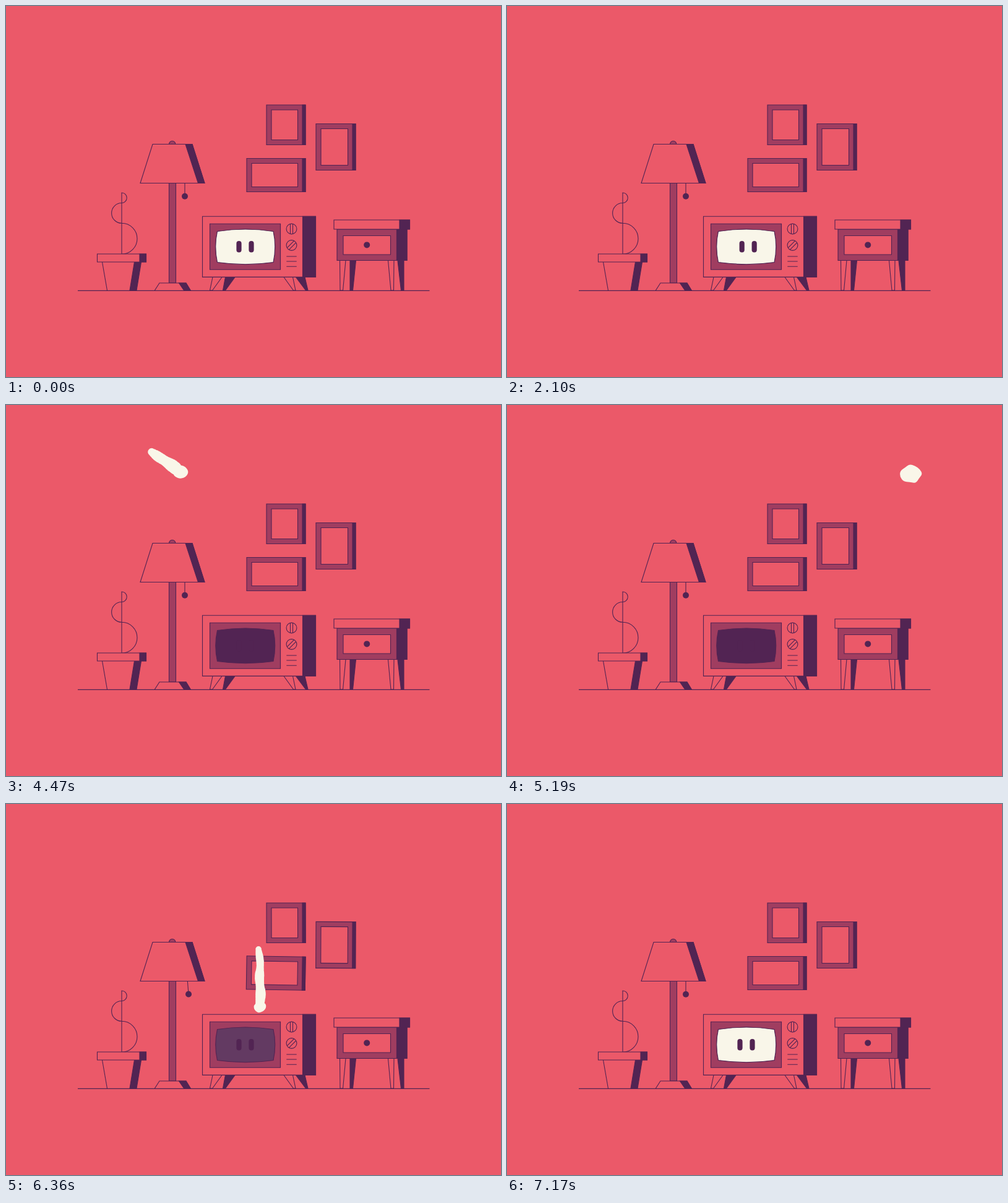
Write an HTML page that moves like this. It is 800 px wide and 600 px high and loops after 7.2 s.

```html
<!DOCTYPE html>
<html lang="en">
<head>
<meta charset="utf-8">
<title>Living room</title>
<style>
  html, body { margin: 0; width: 100%; height: 100%; overflow: hidden; background: #eb5969; }
  svg { display: block; width: 100vw; height: 100vh; stroke: #522453; stroke-width: 1.1; }
  .bg { fill: #eb5969; }
  .mid { fill: #a03d60; }
  .dark { fill: #522453; }
  .cream { fill: #f9f6e9; }
  .line { fill: none; }
  .flat { stroke: none; }
</style>
</head>
<body>
<svg viewBox="0 0 800 600">
  <defs>
    <path id="glass" d="M341.5 364.5Q387 357.5 432 364.5Q437.5 389 432 414.5Q387 421 341.5 414.5Q336 389 341.5 364.5Z"/>
  </defs>
  <path d="M116 460.4H684.5"/>

  <g id="plant">
    <path class="line" d="M187 401V302A8.25 8.25 0 0 1 187 318.5A16.4 16.4 0 0 0 187 351.3A25 25 0 0 1 187 401.3"/>
    <path class="line" d="M155.5 414L163.5 460"/>
    <path class="dark" d="M207.5 414H218.5L211 460H200Z"/>
    <path class="bg" d="M147.5 401H226.5V414H147.5Z"/>
    <path class="dark" d="M216 401H226.5V414H216Z"/>
  </g>

  <g id="lamp">
    <g id="cord">
      <path d="M289 232V308"/>
      <circle class="dark flat" cx="289" cy="307.8" r="5"/>
    </g>
    <path class="mid" d="M263.5 286.5H274.5V448H263.5Z"/>
    <path class="bg" d="M248 448H291L298.5 460.4H240Z"/>
    <path class="dark" d="M279.5 448H291L298.5 460.4H288Z"/>
    <path class="mid" d="M263.5 223.5A5.2 5.2 0 0 1 273.9 223.5Z"/>
    <path class="bg" d="M237 223.5H301L321 286.5H217Z"/>
    <path class="dark" d="M290 223.5H301L321 286.5H310.5Z"/>
  </g>

  <g id="frames"></g>

  <g id="table">
    <path class="line" d="M539.5 411.5L540 460H544.5L549 411.5M617.5 411.5L622 460H626.5L627 411.5"/>
    <path class="dark" d="M556 411.5H565.5L560.5 460H556ZM633 411.5H643V460H638.5Z"/>
    <path class="mid" d="M535 361H648V411.5H535Z"/>
    <path class="dark" d="M631.5 361H648V411.5H631.5Z"/>
    <path class="bg" d="M545 371.5H621.5V402H545Z"/>
    <circle class="dark flat" cx="583.2" cy="386.4" r="5"/>
    <path class="bg" d="M530 346H652.5V361H530Z"/>
    <path class="dark" d="M636 346H652.5V361H636Z"/>
  </g>

  <path id="spirit" class="cream flat"/>

  <path class="line" d="M334 438.5L329.5 460H333.5L349 438.5M449 438.5L464.5 460H468L463.5 438.5"/>
  <path class="dark" d="M354.5 438.5H370L354.5 460H350.5ZM468.5 438.5H483L488 460H484.5Z"/>
  <g id="tv">
    <path class="bg" d="M317.5 340.3H500.5V438.4H317.5Z"/>
    <path class="dark" d="M479.5 340.3H500.5V438.4H479.5Z"/>
    <path class="mid" d="M329.5 352.3H443.5V426.3H329.5Z"/>
    <use href="#glass" class="dark"/>
    <use id="screen" href="#glass" class="cream"/>
    <g id="eyes" class="dark flat">
      <rect x="372.4" y="380" width="8.2" height="18.5" rx="4.1"/>
      <rect x="392.4" y="380" width="8.2" height="18.5" rx="4.1"/>
    </g>
    <circle class="line" cx="461.5" cy="360.5" r="8.4"/>
    <circle class="line" cx="461.5" cy="387" r="8.4"/>
    <path d="M459.5 352.4V368.6M463.5 352.4V368.6M454.2 391.2L465.7 379.7M457.3 394.2L468.8 382.7M453.3 405H469.7M453.3 413H469.7M453.3 421.2H469.7"/>
  </g>
</svg>
<script>
const LOOP = 7200, STEP = 30;
const el = id => document.getElementById(id);

// Wall frames, with the moment each one is knocked
const frames = [
  { x: 421, y: 160, w: 63, h: 64.5, hit: 5430, kick: 8.8, turns: 2 },
  { x: 501, y: 190.5, w: 64, h: 75, hit: 5370, kick: 5, turns: 2.7 },
  { x: 389, y: 246.5, w: 95, h: 54, hit: 5490, kick: 22, turns: 1.95 }
];

// Key points of the spirit's flight: time, x, y
const flight = [
  [3510, -70, 200], [3630, -14, 208], [3900, 90, 185], [4200, 140, 50], [4350, 209, 62],
  [4650, 405, 165], [4920, 632, 78], [5070, 711, 76], [5190, 653, 111.5], [5310, 610, 140],
  [5490, 450, 262], [5610, 290, 250], [5700, 228, 190], [5850, 320, 143], [6030, 372, 149],
  [6210, 406, 212], [6330, 411, 328], [6450, 411, 440]
];

const box = (cls, x, y, w, h) => `<path class="${cls}" d="M${x} ${y}h${w}v${h}h${-w}Z"/>`;

for (const f of frames) {
  f.node = document.createElementNS('http://www.w3.org/2000/svg', 'g');
  f.node.innerHTML = box('mid', f.x, f.y, f.w, f.h) +
    box('dark', f.x + f.w - 5, f.y, 5, f.h) +
    box('bg', f.x + 8, f.y + 8, f.w - 20.5, f.h - 16);
  el('frames').append(f.node);
}

// Eased rise from 0 to 1; a warp below 1 makes it start faster
function rise(t, from, to, warp = 1) {
  const u = Math.min(Math.max((t - from) / (to - from), 0), 1);
  return (1 - Math.cos(Math.PI * Math.pow(u, warp))) / 2;
}

// Swing that dies out between two moments
function swing(t, from, to, size, turns) {
  const u = (t - from) / (to - from);
  return u > 0 && u < 1 ? size * Math.pow(1 - u, 1.5) * Math.sin(2 * Math.PI * turns * u) : 0;
}

// Smooth curve through the key points
function flightAt(t) {
  const last = flight.length - 1;
  let i = 0;
  while (i < last - 1 && flight[i + 1][0] <= t) i++;
  const p = flight[i], q = flight[i + 1];
  const o = flight[Math.max(i - 1, 0)], r = flight[Math.min(i + 2, last)];
  const d = q[0] - p[0], u = Math.min(Math.max((t - p[0]) / d, 0), 1);
  const s = u * u, c = s * u;
  const [x, y] = [1, 2].map(k => {
    const m0 = (q[k] - o[k]) / (q[0] - o[0]) * d;
    const m1 = (r[k] - p[k]) / (r[0] - p[0]) * d;
    return (2 * c - 3 * s + 1) * p[k] + (c - 2 * s + u) * m0 + (3 * s - 2 * c) * q[k] + (c - s) * m1;
  });
  return [x, Math.min(y, 400)];
}

function noise(seed, i) {
  const n = Math.sin(seed * 12.9 + i * 78.2) * 43758.5;
  return n - Math.floor(n);
}

const num = v => v.toFixed(1);

function dot(x, y, r) {
  const R = num(r), D = num(2 * r);
  return `M${num(x - r)} ${num(y)}a${R} ${R} 0 0 1 ${D} 0a${R} ${R} 0 0 1 -${D} 0Z`;
}

// Closed wobbly outline, smoothed through the midpoints
function lump(x, y, k, seed) {
  const n = 11, pts = [];
  for (let i = 0; i < n; i++) {
    const a = i / n * 2 * Math.PI, f = k * (0.9 + 0.25 * noise(seed, i));
    pts.push([x + Math.cos(a) * 16.7 * f, y + Math.sin(a) * 14.8 * f]);
  }
  const mid = (p, q) => num((p[0] + q[0]) / 2) + ' ' + num((p[1] + q[1]) / 2);
  let d = 'M' + mid(pts[n - 1], pts[0]);
  pts.forEach((p, i) => { d += `Q${num(p[0])} ${num(p[1])} ${mid(p, pts[(i + 1) % n])}`; });
  return d + 'Z';
}

// The faster it flies, the longer and thinner it gets; it is drawn on twos
function spirit(time) {
  const t = Math.floor((time - 30) / 60) * 60 + 30;
  if (t < 3630 || t > 6450) return '';
  const [x, y] = flightAt(t), [ax, ay] = flightAt(t - 8), [bx, by] = flightAt(t + 8);
  const speed = Math.hypot(bx - ax, by - ay) / 16;
  const tail = Math.min(Math.max(200 * (speed - 0.5), 0), 102);
  const seed = t / 60, r = 13.5 - 0.06 * tail;
  let d = lump(x, y, r / 13.5, seed);
  let len = 0, px = x, py = y;
  for (let s = t; len < tail && s > flight[0][0]; s -= 2) {
    const [cx, cy] = flightAt(s);
    len += Math.hypot(cx - px, cy - py);
    px = cx;
    py = cy;
    const taper = 1 - 0.35 * Math.pow(len / tail, 2);
    const ripple = 1 + 0.07 * Math.sin(len * 0.21 + seed * 2);
    d += dot(cx + 0.8 * Math.sin(len * 0.13 + seed), cy, r * taper * ripple);
  }
  return d;
}

const move = (node, value) => node.setAttribute('transform', value);

function draw(t) {
  for (const f of frames) {
    const a = swing(t, f.hit, 6660, f.kick, f.turns);
    move(f.node, `rotate(${a} ${f.x + f.w / 2} ${f.y + 8})`);
  }

  // The lamp tips over whichever foot it leans on
  const lean = swing(t, 5580, 6180, -6.8, 1.1);
  move(el('lamp'), `rotate(${lean} ${lean > 0 ? 298.5 : 240} 460.4)`);
  move(el('cord'), `rotate(${swing(t, 5580, 6870, 18.5, 2.87)} 289 232)`);

  const w = 1 + swing(t, 6600, 7170, 0.2, 2);
  move(el('tv'), `translate(409 438.4) scale(${w} ${2 - w}) translate(-409 -438.4)`);
  el('screen').setAttribute('opacity', t < 3060 ? 1 : rise(t, 6290, 6630));

  const look = -11 * rise(t, 210, 540) + 28 * rise(t, 570, 970) - 17 * rise(t, 1600, 2520, 0.55);
  move(el('eyes'), `translate(${look} 0)`);
  el('spirit').setAttribute('d', spirit(t));
}

const start = performance.now();
function tick() {
  const t = (performance.now() - start) % LOOP;
  draw(Math.floor(t / STEP) * STEP);
  requestAnimationFrame(tick);
}
tick();
</script>
</body>
</html>
```
